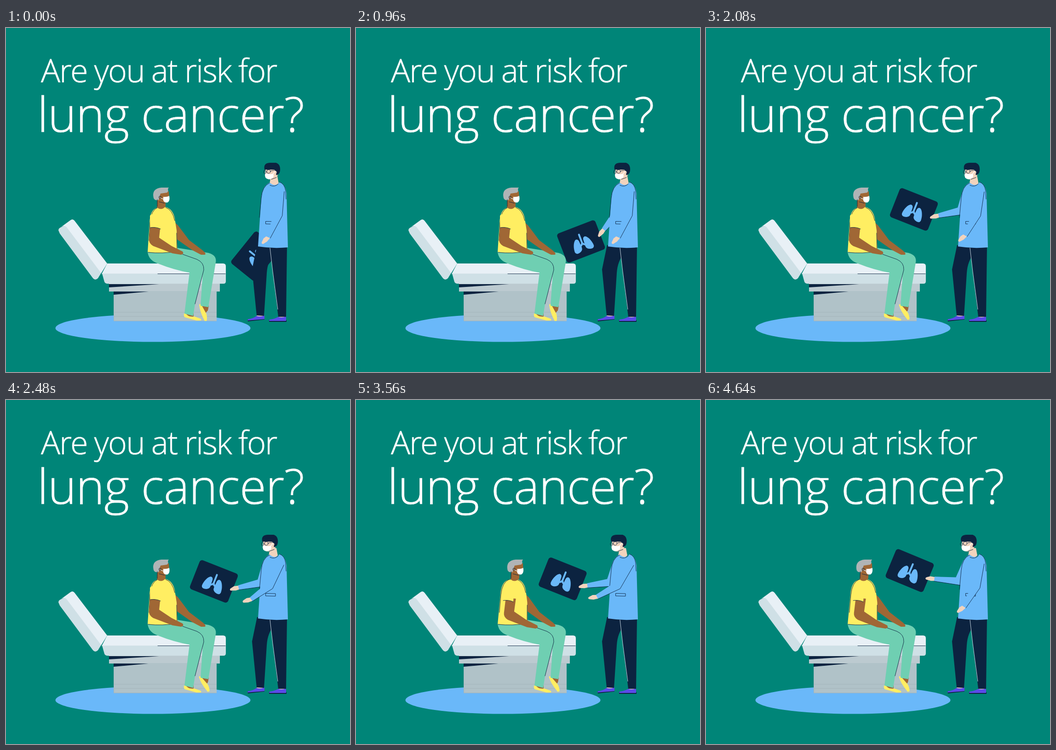
Animation, 748 px wide and 748 px high, one loop 5760 ms. Source, as an HTML page:

```html
<!DOCTYPE html>
<html lang="en">
<head>
<meta charset="utf-8">
<title>Are you at risk?</title>
<style>
  html, body { margin: 0; height: 100%; overflow: hidden; background: #008578; }
  svg { display: block; width: 100%; height: 100%; }
  text { font-family: "Open Sans", "Noto Sans", sans-serif; font-weight: 300; fill: #fff; stroke: #fff; stroke-width: .7; }
  .navy { fill: #0c2340; }
  .blue { fill: #6ab8f9; }
  .pale { fill: #e8f0f6; }
  .ice { fill: #cfe0e6; }
  .green { fill: #6fcfb2; }
  .yellow { fill: #ffee62; }
  .brown { fill: #a06735; }
  .skin { fill: #f1d3bd; }
  .white { fill: #fff; }
  .line { fill: none; stroke: #0c2340; stroke-width: .9; stroke-linecap: round; stroke-linejoin: round; }
</style>
</head>
<body>
<svg viewBox="0 0 748 748">
  <text x="76" y="118" font-size="70" letter-spacing="-1.9" word-spacing="-1">Are you at risk for</text>
  <text x="68" y="226" font-size="105" letter-spacing="-.8">lung cancer?</text>

  <ellipse class="blue" cx="319.5" cy="652.5" rx="212" ry="30"/>

  <g id="table">
    <path class="ice" d="M114 440Q114 436 118 434L131 428L219 513L200 544Q194 550 189 544L117 447Z"/>
    <path class="pale" d="M118 434L140 418Q145 414 149 419L220 512L207 533L131 432Q126 428 118 434Z"/>
    <path fill="#bccad0" d="M224 555H465V573H224Z"/>
    <path fill="#b0c2c8" d="M234 572H458V637H234Z"/>
    <path fill="none" stroke="#a3b4ba" d="M234.500 573V637H458M234 618H458M234 627H458"/>
    <path class="navy" d="M224 557H333L224 564ZM234 573H310L234 580Z"/>
    <path class="pale" d="M208 535L220 512H472Q478 512 478 518V535Z"/>
    <path class="ice" d="M209 534H478V551Q478 556 473 556H221Q216 556 214 552Z"/>
    <path class="line" d="M330 534.500H477"/>
  </g>

  <g id="patient">
    <path class="brown" d="M427 602L441 604L439 614L432 622L425 610Z"/>
    <path id="farShoe" class="yellow" d="M420 601Q424 599 426 604L436 622Q438 633 436 637H432Q421 616 420 601Z"/>
    <path class="brown" d="M391 618H408V628L392 626Z"/>
    <path class="yellow" d="M387 621Q390 619 393 623Q400 630 409 627L423 632Q426 635 423 636H414L389 629Q386 627 387 621Z"/>
    <path class="green" d="M360 476L440 489Q459 494 456 510L440 607L423 604L428 530Z"/>
    <path class="green" d="M308 487Q310 505 330 512Q365 526 399 532L388 621L407 626L411 600L430 526Q433 512 416 505L372 483Z"/>
    <path class="line" d="M384 492L415 503Q431 510 430 526L411 600"/>
    <g id="torso">
      <path class="brown" d="M364 420L374 429L398 461L427 483Q437 491 432 493H424L405 483L371 459Z"/>
      <path class="yellow" d="M328 391Q313 396 312 424L308 487Q340 492 373 486L371 440L367 414Q363 394 347 389Z"/>
      <path class="line" d="M330 390Q315 396 313 424L311 462M309 488Q340 491 372 486L371 446M347 390Q362 395 367 419"/>
      <path id="nearArm" class="brown" d="M314 426L336 428L333 456L360 474L384 486Q388 491 381 493L362 490L320 474Q310 468 311 459Z"/>
      <g id="sleeve">
        <path class="yellow" d="M313 408Q324 398 337 412L336 437Q324 432 313.500 434Z"/>
        <path class="line" d="M314 434Q326 432 336 437"/>
      </g>
      <g id="patientHead">
        <path class="brown" d="M329 372H347V388Q338 398 328 390Z"/>
        <path class="brown" d="M329 358L354 355L355 369L351 379L337 380L328 373Z"/>
        <path fill="#b0b4b6" d="M321 370Q316 349 338 347H354L352 350Q354 355 350 358L336 360L332 374Q324 376 321 370Z"/>
        <path fill="none" stroke="#fff" stroke-width="1.2" d="M335 369L344 373"/>
        <path class="white" d="M342 367Q349 368 355 365Q357 375 352 379Q345 381 342 375Z"/>
        <circle class="line" cx="335" cy="368" r="2.500"/>
        <path class="line" d="M329 373V388M333 378L345 381"/>
      </g>
    </g>
  </g>

  <g id="board">
    <rect class="navy" x="-44.500" y="-34" width="89" height="68" rx="6"/>
    <g transform="translate(1 .5)">
      <path fill="none" stroke="#6ab8f9" stroke-width="4" stroke-linecap="round" d="M0-16V3Q-1 7-6 9M0 3Q1 7 6 9"/>
      <path id="lung" class="blue" d="M-10-8C-15-8-22 5-22 17Q-21 23-14 22Q-4 20-4 12L-5-3Q-6-8-10-8Z"/>
      <use href="#lung" transform="scale(-1 1)"/>
    </g>
  </g>

  <g id="doctor">
    <path id="backHand" class="skin" d="M-2-4L7-5L18-3Q21 0 17 2L9 5L-2 4Z"/>
    <path id="backArm" class="blue"/>
    <path id="backLine" class="line"/>
    <path class="skin" d="M545 622H561V630H545ZM592 624H608V631H592Z"/>
    <path class="navy" d="M525 634L562 631V634L526 638ZM572 635H610V639H572Z"/>
    <path fill="#5b4be8" d="M526 633Q537 632 545 626Q553 629 562 625V633L525 636ZM573 634Q584 633 592 628Q600 631 609 627V637H572Z"/>
    <path class="navy" d="M546 472H582L577 498Q568 514 567 533L561 626L545 625L535 525Z"/>
    <path class="navy" d="M573 474H611L609 628H592L576 497Z"/>
    <path fill="none" stroke="#d5e4ee" stroke-width=".9" d="M574 478L580 530L591 612"/>
    <path id="neck" class="skin" d="M576 322H590L593 338Q584 347 573 339Z"/>
    <path class="blue" d="M573 336Q557 344 555 370L548 475Q580 480 613 477L610 360Q608 340 595 335Q586 347 573 336Z"/>
    <path class="line" d="M573 337Q557 344 555 370L551 412M595 335Q606 339 608 354L609 372M574 342Q584 347 592 339"/>
    <path class="line" d="M565 420.500L586 421V426.500L565 426Z"/>
    <path id="frontHand" class="skin" d="M-2-4L8-5L18-3Q21 0 17 2L9 5L-2 4Z"/>
    <path id="frontArm" class="blue"/>
    <path id="frontLine" class="line"/>
    <g id="doctorHead">
      <path class="skin" d="M564 304H588L591 320L585 330L570 329L563 322Z"/>
      <path class="navy" d="M562 308Q559 293 575 293H587Q597 296 596 310Q595 318 588 320L584 308Z"/>
      <circle class="skin" cx="585" cy="314" r="3.500"/>
      <path fill="none" stroke="#fff" stroke-width="1.200" d="M579 319L586 311"/>
      <path class="white" d="M563 315Q571 319 581 317Q584 324 578 327Q569 331 564 325Z"/>
      <circle class="line" cx="571" cy="312" r="4"/>
      <ellipse class="line" cx="563" cy="313" rx="2.500" ry="4"/>
      <path class="line" d="M575 311L584 309M577 329L588 325"/>
    </g>
  </g>
</svg>
<script>
const LOOP = 5760, STEP = 40, FIRST_MOVE = 360, LAST_MOVE = 4640;
const RAD = Math.PI / 180;
const el = id => document.getElementById(id);
const set = (id, name, value) => el(id).setAttribute(name, value);
const move = (id, value) => set(id, "transform", value);
const mix = (a, b, s) => a.map((v, i) => v + (b[i] - v) * s);
const polar = ([x, y], angle, r) => [x + r * Math.cos(angle * RAD), y + r * Math.sin(angle * RAD)];

function ease(t, start, end) {
  const u = Math.min(1, Math.max(0, (t - start) / (end - start)));
  return u * u * (3 - 2 * u);
}

// The board swings around the shoulder.
// Pose: board direction, board distance, board tilt, elbow direction, elbow distance.
const BACK_SHOULDER = [568, 352];
const BOARD_DOWN = [94, 149, -58.8, 73, 50];
const BOARD_UP = [159.900, 123.500, 21.5, 107, 48];
const BOARD_SHOWN = [171.400, 126.500, 22.5, 115, 46.500];

// Pose: elbow x, y, wrist x, y.
const FRONT_SHOULDER = [596, 355];
const ARM_DOWN = [592, 406, 570, 455];
const ARM_UP = [568, 404, 524, 428];

// Tapered limb through three joints; returns its outline and its outer edge.
function limb(joints, widths) {
  const normal = (p, q) => {
    const dx = q[0] - p[0], dy = q[1] - p[1], len = Math.hypot(dx, dy);
    return [dy / len, -dx / len];
  };
  const upper = normal(joints[0], joints[1]), lower = normal(joints[1], joints[2]);
  const sum = [upper[0] + lower[0], upper[1] + lower[1]], len = Math.hypot(...sum);
  const normals = [upper, sum.map(v => v / len), lower];
  const side = sign => joints.map((p, i) => p.map((v, k) => v + sign * widths[i] * normals[i][k]));
  const outer = side(1), inner = side(-1);
  return { shape: "M" + outer.concat(inner.reverse()).join("L") + "Z", edge: "M" + outer.join("L") };
}

function drawArm(name, shoulder, elbow, wrist, widths, bend) {
  const { shape, edge } = limb([shoulder, elbow, wrist], widths);
  const angle = Math.atan2(wrist[1] - elbow[1], wrist[0] - elbow[0]) / RAD;
  set(name + "Arm", "d", shape);
  set(name + "Line", "d", edge);
  move(name + "Hand", `translate(${wrist}) rotate(${angle + bend})`);
}

function drawDoctor(t) {
  const raised = mix(BOARD_DOWN, BOARD_UP, ease(t, -40, 2040));
  const [direction, distance, tilt, elbowDirection, elbowDistance] =
    mix(raised, BOARD_SHOWN, ease(t, 3100, 4520));
  const center = polar(BACK_SHOULDER, direction, distance);
  const elbow = polar(BACK_SHOULDER, elbowDirection, elbowDistance);
  const grip = polar(center, tilt, 44);
  const reach = 13 / Math.hypot(elbow[0] - grip[0], elbow[1] - grip[1]);
  move("board", `translate(${center}) rotate(${tilt})`);
  drawArm("back", BACK_SHOULDER, elbow, mix(grip, elbow, reach), [9, 10, 5], 0);

  const lift = ease(t, 1880, 2720) - ease(t, 4040, 4880);
  const arm = mix(ARM_DOWN, ARM_UP, lift);
  drawArm("front", FRONT_SHOULDER, arm.slice(0, 2), arm.slice(2), [9, 9, 5], 22);

  const nod = -7.5 * ease(t, 1860, 2880);
  move("doctorHead", `translate(${nod} 0)`);
  move("neck", `translate(${nod * 0.4} 0)`);
}

function drawPatient(t) {
  const lean = ease(t, 2500, 3500);
  const skew = 0.03 * lean;
  move("torso", `matrix(1 0 ${-skew} 1 ${488 * skew} 0)`);
  move("nearArm", `translate(${10 * lean} ${4 * lean})`);
  move("sleeve", `translate(${4.5 * lean} ${2 * lean})`);
  move("patientHead", `translate(${5 * lean - 2 * ease(t, 3600, 4640)} 0)`);
  move("farShoe", `rotate(${-12 * ease(t, 960, 2200)} 423 605)`);
}

function tick() {
  const time = Math.floor(performance.now() % LOOP / STEP) * STEP;
  const t = Math.min(LAST_MOVE, Math.max(FIRST_MOVE, time));
  drawDoctor(t);
  drawPatient(t);
  requestAnimationFrame(tick);
}
tick();
</script>
</body>
</html>
```
